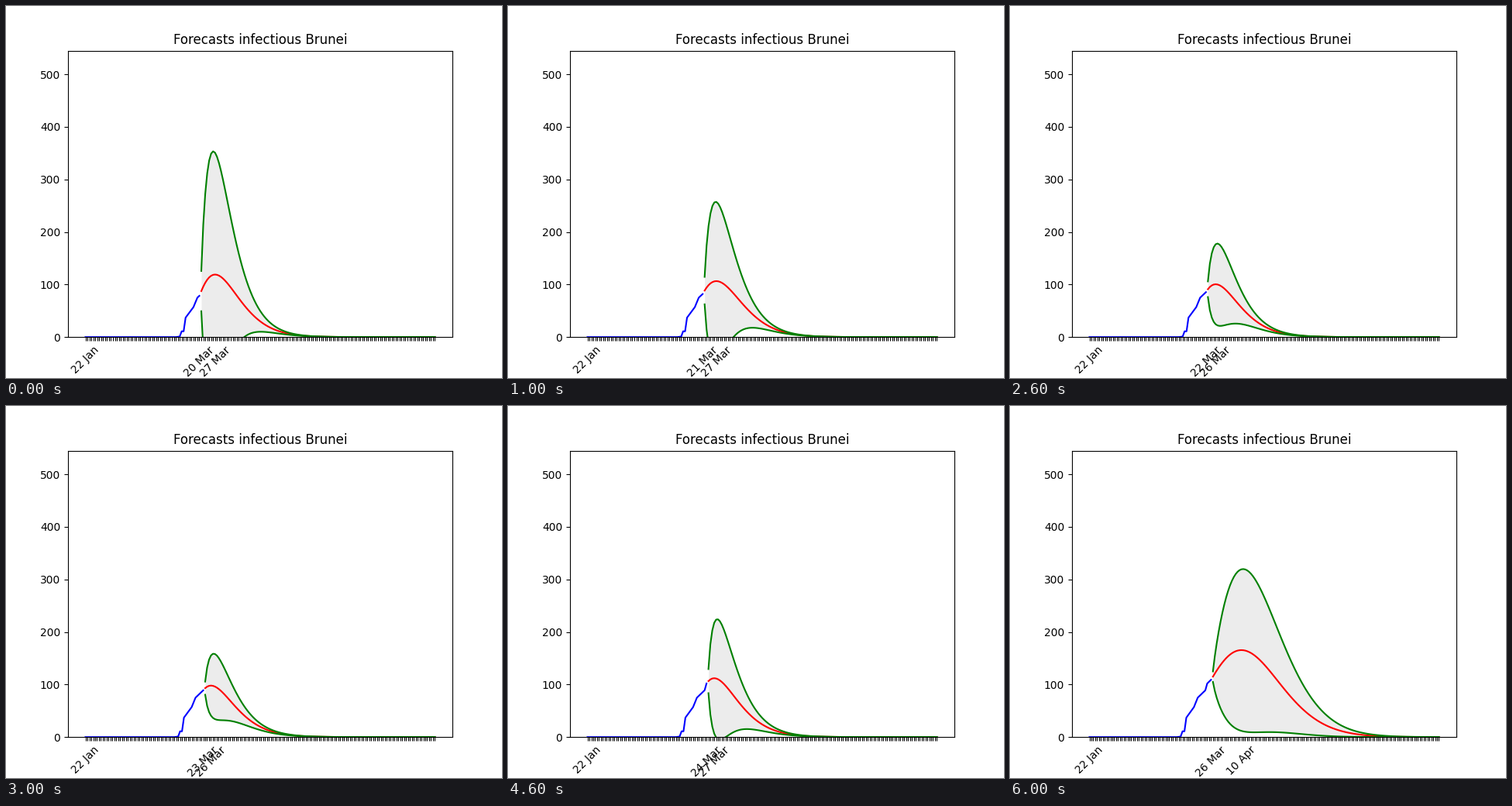
Write a matplotlib script that moves like this. It is 640 by 480 pixels and loops after 7000 ms.

```python
import numpy as np
import matplotlib.pyplot as plt
from matplotlib.animation import FuncAnimation

FIRST_END = 58           # last observed day of the first forecast, from 22 Jan
HORIZON = 120            # forecast length in days

# Active cases: key days, straight lines between them.
CASE_KEYS = [(46, 0), (48, 1), (49, 11), (50, 11), (51, 37), (55, 57),
             (57, 75), (61, 89), (62, 102), (64, 109)]

# Per forecast: peak cases, days to it, peak half width, days to it.
PEAKS = [(119, 7, 235, 5.9), (106.5, 6, 151, 5.6), (100.5, 4, 78, 5.2),
         (98, 3, 62, 5), (112, 3, 114, 5), (128.5, 6, 168, 7.3),
         (165.5, 15, 154.5, 16.5)]

observed = np.arange(FIRST_END + len(PEAKS))
cases = np.interp(observed, *zip(*CASE_KEYS))
t = np.arange(HORIZON)


def hump(height, peak, lead, sharp, tail=1):
    """Skewed bell that reaches its height at the peak day."""
    x = (t + lead) / (peak + lead)
    return height * np.exp(sharp * (np.log(x) - (x ** tail - 1) / tail))


def forecast(last_cases, height, peak, spread, spread_peak):
    """Mean that continues from the last observation, and its half width."""
    rise = peak + 1
    decay = 0.14 + 0.0045 * peak
    scale = decay * rise ** 2 / (2 * np.log(height / last_cases)) + rise / 1.5
    mean = hump(height, peak, scale - peak, decay * scale)
    band = hump(spread, spread_peak, 0.28, 0.8, 0.9 + 0.04 * peak)
    return mean, band


def date_label(day):
    day += 22
    for month, length in (("Jan", 31), ("Feb", 29), ("Mar", 31), ("Apr", 30)):
        if day <= length:
            return f"{day} {month}"
        day -= length


fig, ax = plt.subplots(figsize=(6.4, 4.8), dpi=100)


def draw(step):
    end = FIRST_END + step
    last = end + HORIZON
    days = end + 1 + t
    mean, band = forecast(cases[end], *PEAKS[step])

    ax.clear()
    ax.fill_between(days, mean - band, mean + band,
                    color="gray", alpha=0.15, linewidth=0)
    ax.plot(observed[:end + 1], cases[:end + 1], color="blue")
    ax.plot(days, mean, color="red")
    for edge in (mean - band, mean + band):
        ax.plot(days, edge, color="green")

    # The peak's label stands one day after its date.
    peak_date = end + PEAKS[step][1]
    labels = [""] * (last + 1)
    labels[0] = date_label(0)
    labels[end] = date_label(end)
    labels[peak_date + 1] = date_label(peak_date)
    ax.set_xticks(np.arange(last + 1), labels, rotation=45)
    ax.set_xlim(-0.05 * last, 1.05 * last)
    ax.set_ylim(0, 5 * cases.max())
    ax.set_title("Forecasts infectious Brunei")
    return []


anim = FuncAnimation(fig, draw, frames=len(PEAKS), init_func=lambda: [],
                     interval=1000, repeat=True, repeat_delay=0)
plt.show()
```
